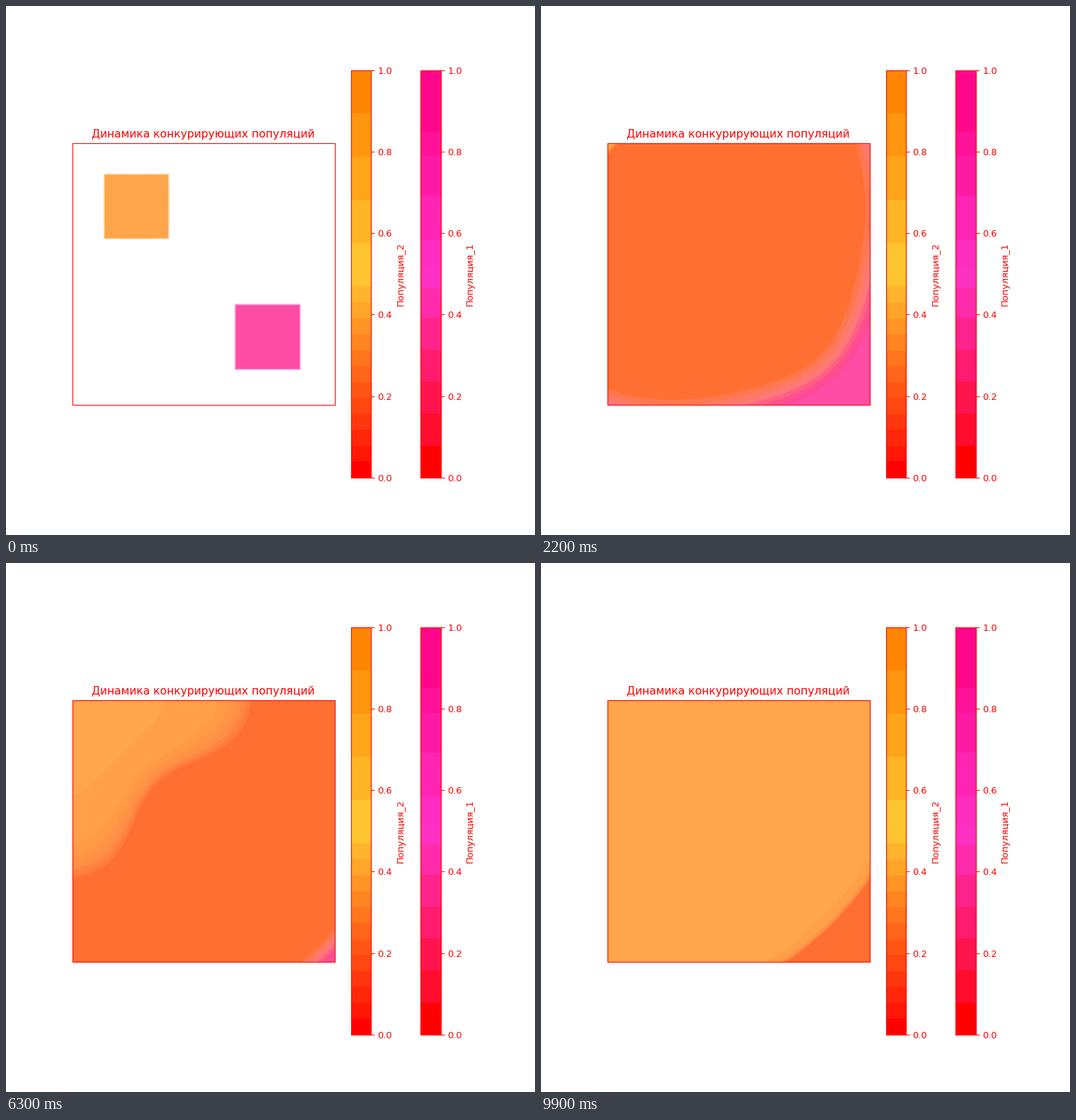
Write a matplotlib script that moves like this. It is 748x748 px and loops after 10000 ms.

```python
import numpy as np
import matplotlib.pyplot as plt
from matplotlib.animation import FuncAnimation
from matplotlib.colors import LinearSegmentedColormap

plt.rcParams.update({
    "font.family": "DejaVu Sans", "text.color": "red", "axes.edgecolor": "red",
    "axes.labelcolor": "red", "ytick.color": "red", "axes.titlecolor": "red",
})

N = 371          # field size in pixels
ALPHA = 0.7      # opacity of a full population
HALF = 46        # half side of the seed squares

pink = LinearSegmentedColormap.from_list(
    "pink", [(1, 0, 0), (1, 50 / 255, 200 / 255), (1, 0, 127 / 255)])
orange = LinearSegmentedColormap.from_list(
    "orange", [(1, 0, 0), (1, 200 / 255, 50 / 255), (1, 127 / 255, 0)])

# Shades that the fields are reduced to
SHADES = np.array([0, .12, .24, .38, .52, .68, .84, 1])
CUTS = (SHADES[1:] + SHADES[:-1]) / 2

u, v = np.meshgrid(np.arange(N) + .5, np.arange(N) + .5)


def distance(c):
    return np.hypot(u - c, v - c)


def box_distance(c):
    return np.maximum(abs(u - c), abs(v - c))


corner_r = distance(0)
cloud_r = distance(240)
box1 = box_distance(275)
r2 = distance(90.5)
square = r2 / box_distance(90.5)

# Shape terms: middle of a front, its nose on the diagonal, its rear
middle = np.exp(-((u - v) / 150) ** 2)
turn = abs((np.degrees(np.arctan2(v - 90.5, u - 90.5)) + 135) % 360 - 180)
nose = np.exp(-(turn / 20) ** 2)
rear = np.sin(np.radians(turn / 2)) ** 6


def population_1(t):
    # A spreading cloud with logistic growth
    reach = 265 * t ** .28 + 1e-6
    p = .75 * np.clip(1 - cloud_r / reach, 0, 1)
    p = p / (p + (1 - p) * np.exp(-6 * (t - 1)))
    if t > 2.6:
        p = np.ones_like(p)
    elif t < 2.2:
        p = np.maximum(p, np.clip((HALF + 2 * min(t, 1) + 1.5 - box1) / 3, 0, 1))

    # Later it dies out from the upper left
    if t > 4.8:
        start, gap, dent, dent_end = (
            np.interp(t, [4.8, 6.3, 8.3, 9.9], key) for key in (
                [0, 160, 374, 433], [1, 100, 10, 16], [0, 55, 103, 0], [0, 90, 20, 0]))
        first = start - dent * middle
        last = start + gap - dent_end * middle
        x = np.clip((corner_r - first) / (last - first), 0, 1)
        p = np.where(x > 0, .07 + .93 * x ** 4, 0)
    return p


def population_2(t):
    width = np.interp(t, [0, 1, 2.2, 4.6, 6.3], [3, 55, 44, 47, 30])
    slow = np.exp(-(max(t - 1, 0) / 1.16) ** 1.6)
    front = 347 - 222 * slow + 40 * max(t - 6.3, 0)
    full = front + (15 + 23 * slow) * nose - 32 * slow * rear
    if t < 1:
        full = (1 - t) * (HALF - 1.5) * square + t * full
    p = np.clip(1 - (r2 - full) / width, 0, 1)
    tail = .3 * min(t, 1) * np.clip(1 - r2 / 300, 0, 1)
    return np.maximum(p, tail)


def paint(t):
    img = np.ones((N, N, 3))
    for field, cmap in ((population_1(t), pink), (population_2(t), orange)):
        p = SHADES[np.digitize(field, CUTS)]
        a = ALPHA * p[..., None]
        img = img * (1 - a) + cmap(p)[..., :3] * a
    return img


fig = plt.figure(figsize=(8, 8), dpi=93.5, facecolor="white")
ax = fig.add_axes([.125, .2457, .496, .4955])
ax.set(xticks=[], yticks=[])
ax.set_title("Динамика конкурирующих популяций")
image = ax.imshow(paint(0), extent=(0, N, N, 0), interpolation="nearest", aspect="auto")


def color_bar(left, cmap, label, edges):
    bar = fig.add_axes([left, .1087, .0385, .77])
    mids = (edges[1:] + edges[:-1]) / 2
    mids[-1] = 0
    bar.barh(edges[1:], 1, height=-np.diff(edges), align="edge",
             color=cmap(mids), linewidth=0)
    bar.set(xlim=(0, 1), ylim=(0, 1), xticks=[])
    bar.yaxis.tick_right()
    bar.yaxis.set_label_position("right")
    bar.set_ylabel(label)


color_bar(.652, orange, "Популяция_2",
          np.r_[np.linspace(1, .47, 6), np.linspace(.43, 0, 12)])
color_bar(.78375, pink, "Популяция_1",
          np.r_[1, .85, .79, .693, .583, .514, .465, np.linspace(.392, 0, 6)])


def update(i):
    image.set_data(paint(i / 10))
    return image,


anim = FuncAnimation(fig, update, frames=100, interval=100, repeat=True, repeat_delay=0)
plt.show()
```
